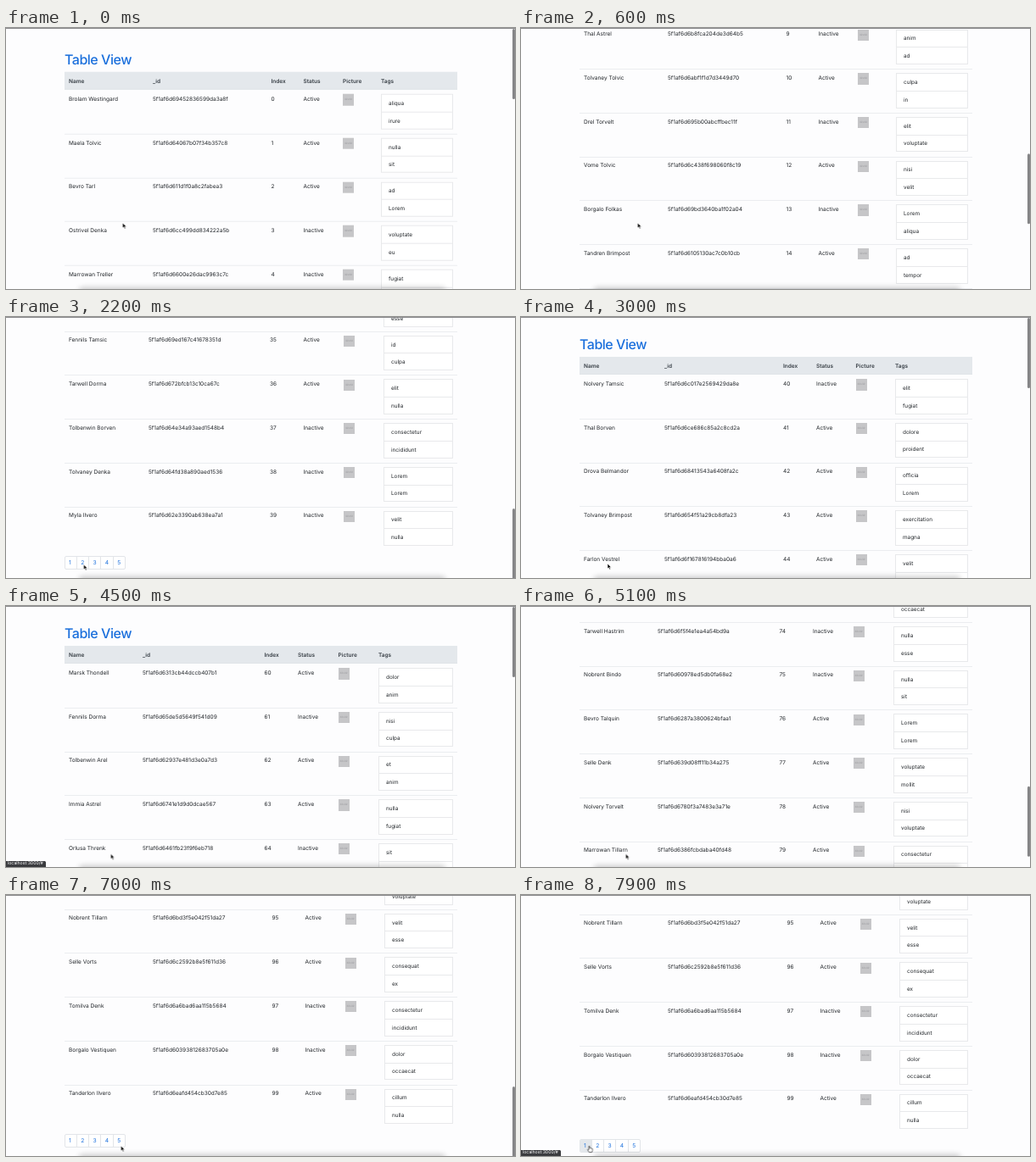
An HTML page for the animation above (8 s loop, 600 px wide and 308 px high).

```html
<!DOCTYPE html>
<html lang="en">
<head>
<meta charset="utf-8">
<title>Table View</title>
<style>
@property --scroll { syntax: "<number>"; inherits: true; initial-value: 0; }

html, body { margin: 0; width: 100%; height: 100%; overflow: hidden; background: #fdfdfe; }
.stage {
  --page: 0; --hand: 0; --tip: 0; --hot: 1; --bar: 1;
  position: relative; width: 600px; height: 308px; overflow: hidden;
  background: #fdfdfe; color: #212529;
  font: 6.5px/10px Inter, Roboto, sans-serif;
  text-rendering: geometricPrecision; white-space: nowrap;
  animation: state 8s step-end infinite, scroll 8s ease-in-out infinite;
}
.stage div, .stage span, h1 { position: absolute; box-sizing: border-box; }
.doc { left: 0; top: 0; transform: translateY(calc(var(--scroll) * -1px)); }
h1 {
  left: 69px; top: 22px; margin: 0; color: #1a6fdc;
  font-size: 16px; line-height: 20px; font-weight: 500; letter-spacing: -.03em;
}
.strip { left: 0; top: 0; transform: translateX(calc(var(--page) * -600px)); }
.page { top: 0; width: 600px; }
.head {
  left: 69px; top: 47px; width: 463px; height: 21.4px;
  background: #e4e8ec; border-bottom: 1px solid #e0e4e8;
}
.label { top: 53.1px; color: #363d44; font-weight: 600; }
.row { left: 0; width: 600px; height: 51.7px; }
.row::before {
  content: ""; position: absolute; left: 69px; top: 0;
  width: 463px; height: 1px; background: #ebedf0;
}
.row:first-child::before { display: none; }
.cell { top: 5.8px; }
.pic {
  top: 5.2px; width: 13.2px; height: 13.2px; background: #c6c6c8; color: #a3a3a6;
  font-size: 3px; line-height: 13.2px; text-align: center; font-weight: 600;
}
.tags { top: 5px; right: 73px; height: 41.6px; background: #fff; border: 1px solid #e8e9eb; }
.tags::after {
  content: ""; position: absolute; left: 0; right: 0; top: 19.8px;
  height: 1px; background: #e8e9eb;
}
.tags span { left: 8px; top: 4.9px; font-size: 6.4px; }
.tags span + span { top: 25.5px; }

.pager {
  left: 69px; top: 1108.8px; width: 71.5px; height: 16px;
  background: #fff; border: 1px solid #e2e5e9; border-radius: 2px; overflow: hidden;
}
.hot {
  left: calc(var(--hot) * 14.3px - 1px); top: 0; width: 14px; height: 14px;
  background: #e3e7eb; opacity: var(--hand);
}
.link {
  top: 0; width: 14.3px; height: 14px; color: #1a6fdc;
  font-size: 6.7px; line-height: 14.6px; text-align: center;
}
.link + .link { border-left: 1px solid #e2e5e9; }

.edge { left: 0; top: 0; width: 600px; height: 1px; background: #8c8c8e; }
.thumb {
  left: 596.5px; top: 1px; width: 3.5px; height: 82.5px; border-radius: 2px; background: #858587;
  transform: translateY(clamp(0px, calc(var(--scroll) * .274px), 225px)); opacity: var(--bar);
}
.shade {
  left: 88px; bottom: -5px; width: 428px; height: 4px; border-radius: 3px;
  box-shadow: 0 -1px 6px 2px rgba(0, 0, 0, .2);
}
.tip {
  left: 0; bottom: 0; width: 47px; height: 7px; padding-left: 2px; border-radius: 0 1.5px 0 0;
  background: #3a3b3e; color: #fff; font-size: 5.2px; line-height: 7px; opacity: var(--tip);
}
.cursor { left: 0; top: 0; animation: move 8s ease-in-out infinite; }
.cursor svg { position: absolute; left: 0; top: 0; overflow: visible; stroke-width: .6; }
.arrow { stroke: #fff; opacity: calc(1 - var(--hand)); }
.hand { fill: #fff; stroke: #111; opacity: var(--hand); }

/* Discrete state: page shown, hovered link, pointer shape, address bubble, scrollbar */
@keyframes state {
  0% { --page: 0; --hand: 0; --tip: 0; --hot: 1; --bar: 1; }
  14.375% { --hand: 1; --tip: 1; }
  17.875% { --page: 1; --hand: 0; --hot: 2; }
  24.125% { --tip: 0; }
  30.625% { --hand: 1; --tip: 1; }
  34.375% { --page: 2; --hand: 0; --hot: 3; }
  37% { --tip: 0; }
  50.25% { --hand: 1; --tip: 1; }
  54.125% { --page: 3; --hand: 0; --hot: 4; }
  59.5% { --tip: 0; }
  68.375% { --hand: 1; --tip: 1; }
  72.125% { --page: 4; --hand: 0; --hot: 0; }
  78.25% { --tip: 0; }
  95.625%, 100% { --page: 4; --hand: 1; --tip: 1; --hot: 0; --bar: 0; }
}
/* Each pass overshoots the end slightly, settles, then jumps to the top on click */
@keyframes scroll {
  0% { --scroll: -4.7; }
  1.9%, 3.1% { --scroll: 0; }
  10.6% { --scroll: 827; }
  12.5%, 17.87% { --scroll: 821; }
  17.875%, 21.25% { --scroll: 0; }
  27.5% { --scroll: 827; }
  29.4%, 34.37% { --scroll: 821; }
  34.375%, 39.4% { --scroll: 0; }
  46.25% { --scroll: 827; }
  48.1%, 54.12% { --scroll: 821; }
  54.125%, 58.1% { --scroll: 0; }
  65% { --scroll: 827; }
  66.9%, 72.12% { --scroll: 821; }
  72.125%, 78.1% { --scroll: 0; }
  86%, 87.5% { --scroll: 827; }
  90%, 100% { --scroll: 821; }
}
@keyframes move {
  0%, 10% { transform: translate(137.5px, 230px); }
  14.3%, 27.5% { transform: translate(91.5px, 292px); }
  30.6%, 46.25% { transform: translate(102px, 291px); }
  50.2%, 65.3% { transform: translate(123.5px, 292.5px); }
  68.3%, 91.2% { transform: translate(135.5px, 296px); }
  95.6%, 100% { transform: translate(80.5px, 296px); }
}
</style>
</head>
<body>
<div class="stage">
  <div class="doc">
    <h1>Table View</h1>
    <div class="strip"></div>
    <div class="pager"><div class="hot"></div></div>
  </div>
  <div class="edge"></div>
  <div class="thumb"></div>
  <div class="shade"></div>
  <div class="tip">localhost:3000/#</div>
  <div class="cursor">
    <svg class="arrow" width="5" height="8"><path d="M0 0V6L1.4 4.8 2.4 7.1 3.5 6.6 2.5 4.4H4.4Z"/></svg>
    <svg class="hand" width="7" height="8"><path d="M-.6 .5Q0-.4.6 .5V2.8L1.7 2.7 2.8 3 3.8 3.5V5.6L3.1 7.6H-.2L-2 4.7Q-1.9 3.8-.6 4.6Z"/></svg>
  </div>
</div>
<script>
const LABELS = ["Name", "_id", "Index", "Status", "Picture", "Tags"];
const ROWS = 20;

// Left edges of the columns after the name, per page
const COLUMNS = [
  [173, 312.5, 350.5, 397, 442],
  [168, 311, 350.5, 398, 445],
  [169, 309, 348, 394.5, 441],
  [161, 304.5, 344, 391.5, 439],
  [173, 313.5, 352.5, 399.5, 446]
];

// name | id ending | A(ctive) or I(nactive) | tags
const parse = text => text.trim().split("\n").map(line => line.trim().split("|"));
const TOPS = [`
  Brolam Westingard|9452836599da3a8f|A|aliqua irure
  Maela Tolvic|4067b07f34b357c8|A|nulla sit
  Bevro Tarl|11d1f0a8c2fabea3|A|ad Lorem
  Ostrivel Denka|cc499dd834222a5b|I|voluptate eu
  Marrowan Treller|600e26dac9963c7c|I|fugiat est`, `
  Lorenta Straken|6ad0facf0d696cdd|I|elit Lorem
  Tandren Folkas|54b1e226187ad88a|I|in consequat
  Quelmar Bindo|b59247f48cc653f8|A|sit exercitation
  Tarwell Brondisks|840e0ddf8286096d|A|consectetur tempor
  Vome Talquin|e329eb9982d485c9|I|do nulla`, `
  Nolvery Tamsic|c017e2569429da8e|I|elit fugiat
  Thal Borven|ce686c85a2c8cd2a|A|dolore proident
  Drova Belmandor|8413543a6408fa2c|A|officia Lorem
  Tolvaney Brimpost|54f51a29cb8dfa23|A|exercitation magna
  Farlon Vestrel|f167816194bba0a6|A|velit id`, `
  Marsk Thondell|313cb44dccb407b1|A|dolor anim
  Fennils Dorma|5de5d5649f541d09|I|nisi culpa
  Tolbenwin Arel|2937e481d3e0a7d3|A|et anim
  Immia Astrel|741e1d9d0dcae567|A|nulla fugiat
  Orlusa Threnk|461fb23f9f6eb718|I|sit ex`, `
  Bovey Tellidan|465210d97a67177b|I|ad ipsum
  Marvenost Grell|4ba7836504a8ca0a|I|voluptate id
  Ilsha Vantorels|4c4675ef0c8704cf|I|commodo voluptate
  Drel Mungost|02276e4d0e87e365|A|est mollit
  Myla Torvelt|c429dd9c6f6f5f56|A|culpa sint`
].map(parse);
const TAIL = parse(`
  Wenlo Hastrim|7b20c94ae1538df6|A|minim voluptate
  Nobrent Tillarn|bd3f5e042f51da27|A|velit esse
  Selle Vorts|c2592b8e5f611d36|A|consequat ex
  Tomilva Denk|a6bad6aa115b5684|I|consectetur incididunt
  Borgalo Vestiquen|0393812683705a0e|I|dolor occaecat
  Tanderlon Ilvero|eafd454cb30d7e85|A|cillum nulla`);

let seed = 20;
const random = n => {
  seed = (seed * 16807) % 2147483647;
  return Math.floor(seed / 2147483647 * n);
};
const pick = list => list[random(list.length)];

const known = [...TOPS.flat(), ...TAIL];
const words = known.flatMap(row => row[3].split(" "));
const filler = () => [
  pick(known)[0].split(" ")[0] + " " + pick(known)[0].split(" ")[1],
  Array.from({ length: 16 }, () => random(16).toString(16)).join(""),
  pick("AI"),
  pick(words) + " " + pick(words)
];

const at = (cls, x, text) => `<span class="${cls}" style="left:${x}px">${text}</span>`;

function rowHtml(row, i, page, cols) {
  const [name, id, status, tags] = row;
  const [idX, indexX, statusX, picX, tagsX] = cols;
  return `<div class="row" style="top:${68.2 + 51.7 * i}px">` +
    at("cell", 74, name) +
    at("cell", idX, "5f1af6d6" + id) +
    at("cell", indexX, page * ROWS + i) +
    at("cell", statusX, status === "A" ? "Active" : "Inactive") +
    at("pic", picX, "32x32") +
    `<div class="tags" style="left:${tagsX}px">` +
    tags.split(" ").map(tag => `<span>${tag}</span>`).join("") +
    `</div></div>`;
}

function pageHtml(cols, page) {
  const rows = Array.from({ length: ROWS }, (_, i) =>
    TOPS[page][i] || (page === 4 && TAIL[i - ROWS + TAIL.length]) || filler());
  const labels = LABELS.map((label, i) => at("label", i ? cols[i - 1] : 74, label));
  return `<div class="page" style="left:${page * 600}px"><div class="head"></div>` +
    labels.join("") +
    `<div>${rows.map((row, i) => rowHtml(row, i, page, cols)).join("")}</div></div>`;
}

document.querySelector(".strip").innerHTML = COLUMNS.map(pageHtml).join("");
document.querySelector(".pager").insertAdjacentHTML("beforeend",
  COLUMNS.map((_, i) => at("link", i * 14.3 - 1.7, i + 1)).join(""));
</script>
</body>
</html>
```
